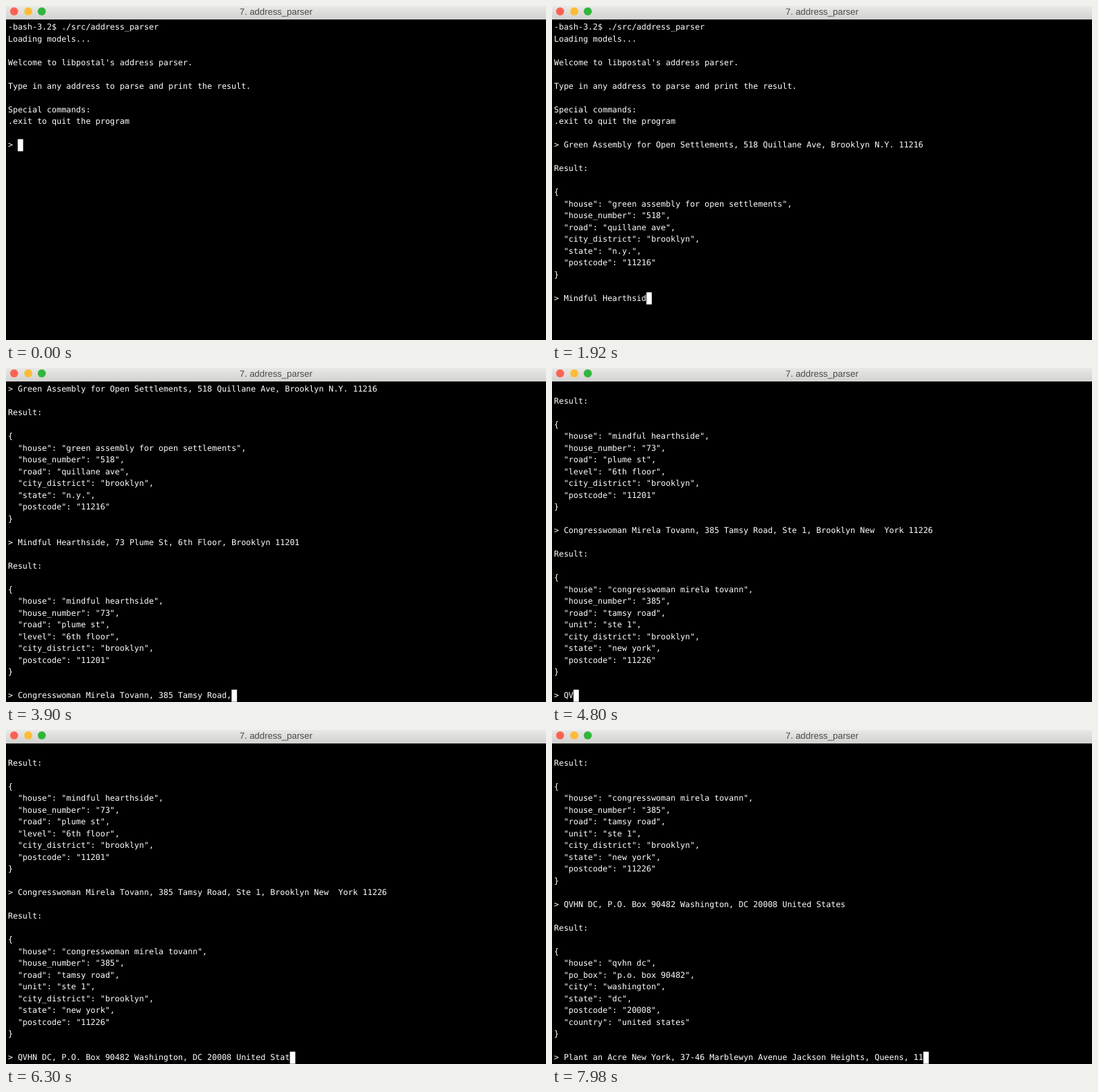
Animation of 800x496 px, one loop 8 s. Source, as an HTML page:

```html
<!DOCTYPE html>
<html lang="en">
<head>
<meta charset="utf-8">
<title>address_parser</title>
<style>
  html, body { margin: 0; width: 100%; height: 100%; overflow: hidden; background: #000; }
  #stage { position: relative; width: 800px; height: 496px; overflow: hidden; background: #000;
    text-rendering: geometricPrecision; }
  #bar { position: absolute; left: 0; top: 0; width: 800px; height: 20px;
    background: linear-gradient(#e8e8e6, #d2d2d0);
    font: 13.4px/18px "Liberation Sans", Arial, sans-serif; color: #4a4a4a; text-align: center; }
  #bar i { position: absolute; top: 2px; width: 12px; height: 12px; border-radius: 50%; }
  #screen { position: absolute; left: 3px; top: 23px; margin: 0; color: #fff;
    font: 11.96px/17.5px "DejaVu Sans Mono", monospace; white-space: pre; }
  #cursor { position: absolute; left: 0; top: 0; width: 7.5px; height: 17.5px; background: #fff; }
</style>
</head>
<body>
<div id="stage">
  <div id="bar">
    <i style="left:6px;background:#fc6254"></i>
    <i style="left:26.5px;background:#fdbc36"></i>
    <i style="left:47px;background:#30b63c"></i>
    7. address_parser
  </div>
  <pre id="screen"></pre>
  <div id="cursor"></div>
</div>
<script>
const LOOP = 8000, STEP = 60, ROWS = 27, COL = 7.2, ROW = 17.5, LEFT = 3, TOP = 22.7;

const intro = [
  "-bash-3.2$ ./src/address_parser",
  "Loading models...",
  "",
  "Welcome to libpostal's address parser.",
  "",
  "Type in any address to parse and print the result.",
  "",
  "Special commands:",
  ".exit to quit the program",
  ""
];

// keys: [time, characters typed]; enter and reply are times in ms
const queries = [
  {
    text: "Green Assembly for Open Settlements, 518 Quillane Ave, Brooklyn N.Y. 11216",
    keys: [[0, 0], [1080, 60], [1320, 74]], enter: 1380, reply: 1500,
    result: { house: "green assembly for open settlements", house_number: "518",
      road: "quillane ave", city_district: "brooklyn", state: "n.y.", postcode: "11216" }
  },
  {
    text: "Mindful Hearthside, 73 Plume St, 6th Floor, Brooklyn 11201",
    keys: [[1620, 0], [2640, 58]], enter: 2700, reply: 2820,
    result: { house: "mindful hearthside", house_number: "73", road: "plume st",
      level: "6th floor", city_district: "brooklyn", postcode: "11201" }
  },
  {
    text: "Congresswoman Mirela Tovann, 385 Tamsy Road, Ste 1, Brooklyn New  York 11226",
    keys: [[3060, 0], [3900, 44], [4500, 76]], enter: 4560, reply: 4620,
    result: { house: "congresswoman mirela tovann", house_number: "385", road: "tamsy road",
      unit: "ste 1", city_district: "brooklyn", state: "new york", postcode: "11226" }
  },
  {
    text: "QVHN DC, P.O. Box 90482 Washington, DC 20008 United States",
    keys: [[4740, 0], [4800, 2], [5880, 39], [6300, 56], [6360, 58]], enter: 6420, reply: 6540,
    result: { house: "qvhn dc", po_box: "p.o. box 90482", city: "washington",
      state: "dc", postcode: "20008", country: "united states" }
  },
  {
    text: "Plant an Acre New York, 37-46 Marblewyn Avenue Jackson Heights, Queens, 11",
    keys: [[6660, 0], [7980, 74]], enter: Infinity
  }
];

const screen = document.getElementById("screen");
const cursor = document.getElementById("cursor");

function typedCount(keys, t) {
  if (t <= keys[0][0]) return 0;
  for (let i = 1; i < keys.length; i++) {
    const [t0, n0] = keys[i - 1], [t1, n1] = keys[i];
    if (t <= t1) return Math.round(n0 + (n1 - n0) * (t - t0) / (t1 - t0));
  }
  return keys[keys.length - 1][1];
}

function linesAt(t) {
  const lines = [...intro];
  for (const { text, keys, enter, reply, result } of queries) {
    lines.push("> " + text.slice(0, typedCount(keys, t)));
    if (t < enter) break;
    lines.push("");
    if (t < reply) break;
    lines.push("Result:", "", ...JSON.stringify(result, null, 2).split("\n"), "");
  }
  return lines.slice(-ROWS);
}

function draw() {
  const t = Math.floor(performance.now() % LOOP / STEP) * STEP;
  const lines = linesAt(t);
  const text = lines.join("\n");
  if (screen.textContent !== text) screen.textContent = text;
  const row = lines.length - 1;
  cursor.style.transform =
    `translate(${LEFT + lines[row].length * COL}px, ${TOP + row * ROW}px)`;
  requestAnimationFrame(draw);
}
draw();
</script>
</body>
</html>
```
